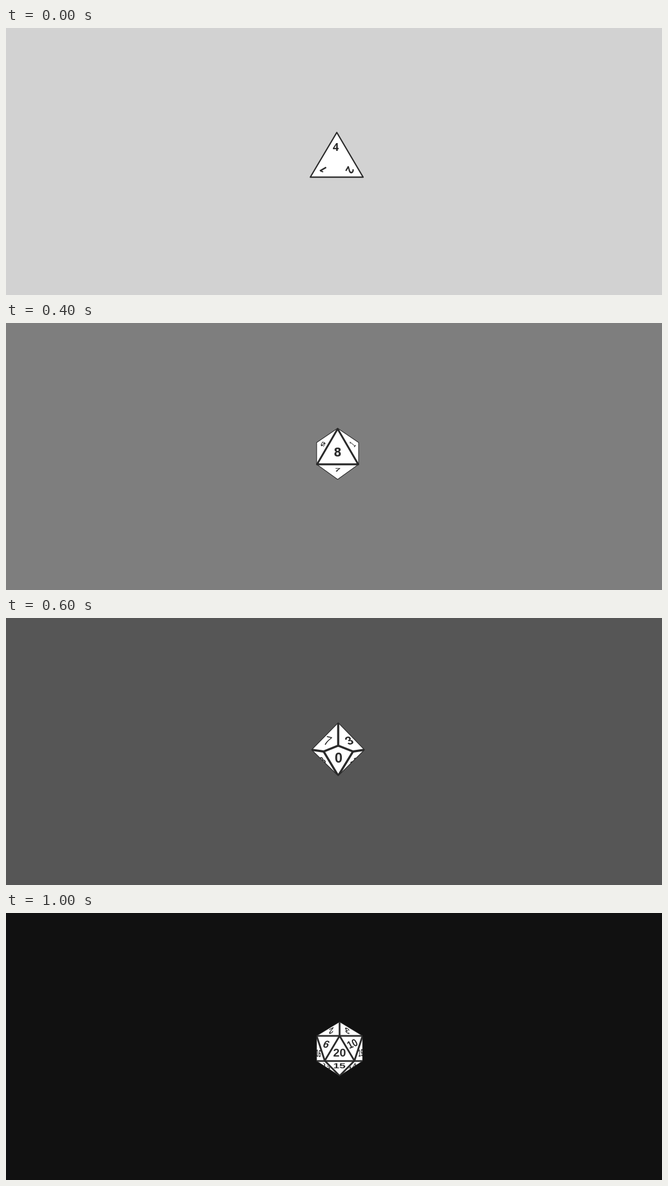
These frames come from a looping animation (1172 by 478 pixels, 1.2 s). An HTML page with a canvas:

```html
<!DOCTYPE html>
<html lang="en">
<head>
<meta charset="utf-8">
<title>Polyhedral dice</title>
<style>
  html, body { margin: 0; width: 100%; height: 100%; overflow: hidden; }
  canvas { display: block; }
</style>
</head>
<body>
<canvas id="stage" width="1172" height="478"></canvas>
<script>
const ctx = document.getElementById('stage').getContext('2d');
const INK = '#2b2b2b', PAPER = '#fff';
const ARIAL = '"Liberation Sans", Arial, sans-serif';
const HUMANIST = '"Open Sans", "Noto Sans", sans-serif';
const STEP = 200;

function trace(points) {
  ctx.beginPath();
  points.forEach(([x, y]) => ctx.lineTo(x, y));
}

function fillShape(points) {
  trace(points);
  ctx.closePath();
  ctx.fillStyle = PAPER;
  ctx.fill();
}

function outline(points, width) {
  trace(points);
  ctx.closePath();
  ctx.lineWidth = width;
  ctx.stroke();
}

function edges(width, ...paths) {
  ctx.lineWidth = width;
  for (const path of paths) {
    trace(path);
    ctx.stroke();
  }
}

// Draws a number centred on its ink box, lying on a tilted face.
function label(text, x, y, size, { turn = 0, sx = 1, sy = 1, skew = 0, font = ARIAL, weight = 'bold' } = {}) {
  ctx.save();
  ctx.translate(x, y);
  ctx.rotate(turn * Math.PI / 180);
  ctx.transform(sx, 0, skew, sy, 0, 0);
  ctx.font = `${weight} ${size}px ${font}`;
  ctx.fillStyle = INK;
  const box = ctx.measureText(text);
  ctx.fillText(text,
    (box.actualBoundingBoxLeft - box.actualBoundingBoxRight) / 2,
    (box.actualBoundingBoxAscent - box.actualBoundingBoxDescent) / 2);
  ctx.restore();
}

function pips(rx, ry, turn, ...centres) {
  ctx.fillStyle = INK;
  for (const [x, y] of centres) {
    ctx.beginPath();
    ctx.ellipse(x, y, rx, ry, turn * Math.PI / 180, 0, 2 * Math.PI);
    ctx.fill();
  }
}

function ring(cx, cy, radius, count) {
  return Array.from({ length: count }, (_, i) => {
    const a = i * 2 * Math.PI / count;
    return [cx + radius * Math.sin(a), cy - radius * Math.cos(a)];
  });
}

function d4() {
  const body = [[591, 187], [638, 267], [543.7, 267]];
  fillShape(body);
  outline(body, 2.4);
  label('4', 589.3, 213, 19, { font: HUMANIST });
  label('1', 567, 254, 18, { turn: -120, font: HUMANIST });
  label('2', 614.5, 254.5, 19, { turn: 120, font: HUMANIST });
}

function d6() {
  const left = [554.5, 215], right = [631.5, 214], middle = [592.8, 237];
  const body = [[592.5, 193.5], right, [632.3, 258], [592.5, 278.5], [554, 258.5], left];
  fillShape(body);
  outline(body, 1.2);
  edges(3.6, [left, middle, right], [middle, [592.8, 278]]);
  edges(2, [left, [554.5, 258]], [right, [632, 258]]);
  pips(6.4, 3.9, 0, [592.5, 200], [604.5, 207], [616.7, 214], [568, 214], [580.2, 221.3], [592.5, 228.5]);
  pips(4, 6.3, -28, [561, 230], [584, 243], [572.3, 249], [561, 255.3], [584, 268]);
  pips(4, 6.3, 28, [624, 230], [601.2, 243], [624, 255], [601.2, 268]);
}

function d8() {
  const body = [[592.5, 188.5], [630, 214], [630, 253], [592.5, 280], [555, 253], [555, 214]];
  fillShape(body);
  outline(body, 1.2);
  outline([[592.5, 189.5], [629.3, 253], [555.7, 253]], 3.4);
  label('8', 592.5, 231, 21, { font: '"DejaVu Sans", sans-serif', sx: 0.95 });
  label('7', 592.3, 263, 18, { sy: 0.5, skew: -0.1 });
  label('5', 566.5, 217, 18, { turn: 120, sy: 0.5 });
  label('1', 619, 216.5, 18, { turn: -48, sx: 0.55, sy: 1, skew: 0, weight: 'normal' , turn: -50 });
}

function d10() {
  const top = [593.5, 187.5], right = [640.5, 236], bottom = [593.5, 282.5], left = [546, 236];
  const peak = [593.5, 228.5], inLeft = [567.5, 239], inRight = [620, 239];
  const body = [top, right, bottom, left];
  ctx.save();
  fillShape(body);
  ctx.clip();
  label('8', 565.5, 255, 19, { turn: -42, sx: 0.7 });
  label('2', 621.5, 256, 19, { turn: 42, sx: 0.7 });
  edges(3.8, [top, peak], [left, inLeft, peak, inRight, right], [inLeft, bottom, inRight]);
  ctx.restore();
  outline(body, 1.2);
  label('0', 593.7, 250, 25);
  label('7', 575, 220, 22, { turn: 14, sx: 0.95, sy: 1.05, skew: -0.2, weight: 'normal' });
  label('3', 613, 219.5, 22, { turn: -22, sx: 0.95, skew: 0.2 });
}

function d12() {
  const outer = ring(594.2, 238.3, 42.3, 10);
  const inner = ring(594.2, 238.3, 21.8, 5);
  fillShape(outer);
  ctx.strokeStyle = '#323232';
  outline(inner, 3.8);
  edges(3.8, ...inner.map((corner, i) => [corner, outer[2 * i]]));
  ctx.strokeStyle = INK;
  label('12', 594.2, 239.3, 19);
  ['8', '4', '6', '11', '2'].forEach((number, i) => {
    const turn = 36 + 72 * i, a = turn * Math.PI / 180;
    label(number, 594.2 + 31 * Math.sin(a), 238.3 - 31 * Math.cos(a), 19, { turn: turn + 180 });
  });
}

function d20() {
  const top = [596, 195], bottom = [596, 291.5], apex = [596, 220];
  const upLeft = [555, 220], upRight = [637, 220], lowLeft = [555, 265], lowRight = [637, 265];
  const left = [569.5, 264.5], right = [622.5, 264.5];
  const body = [top, upRight, lowRight, bottom, lowLeft, upLeft];
  ctx.save();
  fillShape(body);
  ctx.clip();
  label('16', 558.5, 251, 18, { turn: 8, sx: 0.45, skew: 0.1 });
  label('19', 634, 250, 18, { turn: -8, sx: 0.45, skew: -0.1 });
  label('13', 573, 275, 16, { turn: 36, sy: 0.45, skew: 0.3 });
  label('14', 619, 275, 16, { turn: -36, sy: 0.45, skew: -0.3 });
  edges(3.2, [upLeft, upRight], [top, apex], [lowLeft, lowRight],
    [upLeft, left, apex, right, upRight], [left, bottom, right]);
  ctx.restore();
  outline(body, 0.8);
  label('20', 595.8, 250, 20.5);
  label('15', 596, 274, 20, { sy: 0.62 });
  label('6', 572, 235, 19, { turn: 12, sx: 0.95, skew: -0.2 });
  label('10', 619, 234, 19, { turn: -22, sx: 0.85, skew: 0.1 });
  label('2', 581, 211, 18, { turn: 152, sy: 0.65, skew: -0.4 });
  label('3', 610, 211, 18, { turn: -152, sy: 0.65, skew: 0.4 });
}

const scenes = [
  ['#d2d2d2', d4], ['#a6a6a6', d6], ['#7e7e7e', d8],
  ['#565656', d10], ['#323232', d12], ['#111111', d20]
];

function render() {
  const [background, drawDie] = scenes[Math.floor(performance.now() / STEP) % scenes.length];
  ctx.fillStyle = background;
  ctx.fillRect(0, 0, 1172, 478);
  ctx.strokeStyle = INK;
  ctx.lineJoin = 'round';
  drawDie();
  requestAnimationFrame(render);
}
render();
</script>
</body>
</html>
```
